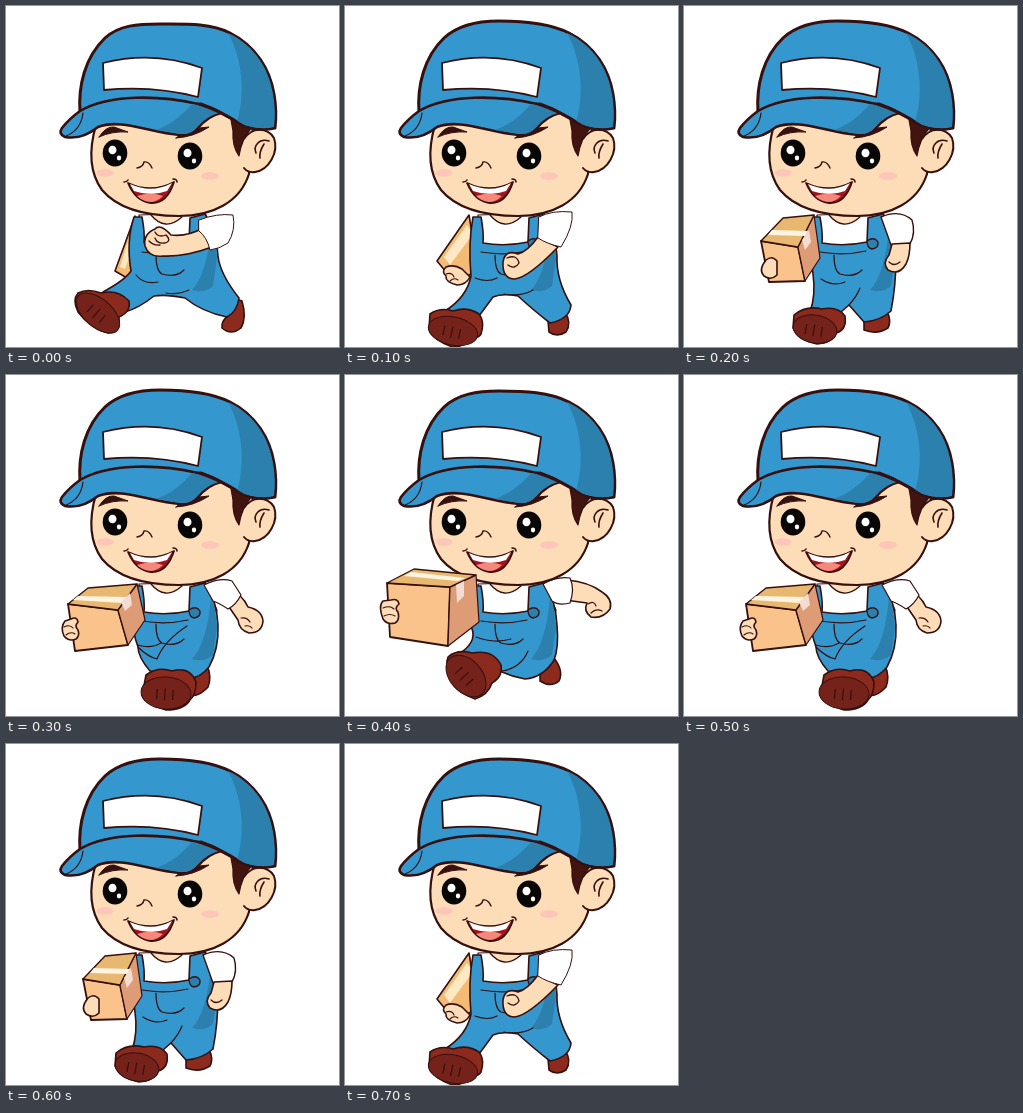
An HTML page for the animation above (800 ms loop, 333 px wide and 341 px high).

```html
<!DOCTYPE html>
<html>
<head>
<meta charset="utf-8">
<style>
html, body { margin: 0; width: 333px; height: 341px; overflow: hidden; background: #fff }
svg { display: block }
</style>
</head>
<body>
<svg id="stage" width="333" height="341" viewBox="0 0 333 341" stroke-linejoin="round" stroke-linecap="round"></svg>
<script>
const INK = '#35100f', BLUE = '#3498cf', DEEP = '#2b80ae', SKIN = '#fddcb8',
      SHOE = '#8c2b1d', SOLE = '#74221a', WHITE = '#fff';

const path = (d, fill = 'none', width = 1.6, ink = INK) =>
  `<path d="${d}" fill="${fill}" stroke="${width ? ink : 'none'}" stroke-width="${width}"/>`;
const oval = (x, y, rx, ry, fill) => `<ellipse cx="${x}" cy="${y}" rx="${rx}" ry="${ry}" fill="${fill}"/>`;
const poly = (points, fill, width) => path('M' + points.join('L') + 'Z', fill, width);

function eye(x, y) {
  return oval(x, y, 12.3, 13.5, '#090606') + oval(x - 2.5, y - 3, 4, 4.3, WHITE) + oval(x + 4, y + 5, 2.2, 2.4, WHITE);
}

function head(top) {
  return path('M90 119C83 143 83 166 96 184C112 203 140 210 173 210C207 210 234 196 243 168L247 120L205 103Z', SKIN, 2.2) +
    path('M224 108L246 121Q235 134 233 150Q226 140 227 125Z', '#421410', 1.2) +
    path('M238 133C246 121 261 121 268 132C273 146 263 164 249 166Q242 167 238 162', SKIN, 2) +
    path('M263 135C253 132 247 140 250 147M258 138Q253 146 254 152') +
    oval(99, 167, 8.5, 3.8, '#fdc6b8') + oval(204, 170, 9, 3.8, '#fdc6b8') +
    eye(109, 147) + eye(184, 150) +
    path('M93 131Q100 120 108 121L122 126Q106 125 93 131Z', INK, 1) +
    path('M170 132Q180 122 203 121Q188 131 170 132Z', INK, 1) +
    path('M131 162Q137 161 138 156Q143 155 146 162', 'none', 1.4) +
    path('M122 177Q146 188 168 176Q161 198 145 197Q130 196 122 177Z', '#a5141c', 1.8) +
    path('M124 178Q146 188 166 177L161 185Q145 191 128 185Z', WHITE, 0) +
    path('M131 190Q145 185 157 190Q151 196 144 196Q136 195 131 190Z', '#f5877b', 0) +
    path('M118 176Q121 176 122 174M167 173Q171 173 171 176') +
    // cap
    path(`M74 107C72 80 79 51 99 32C113 19 132 ${top} 154 ${top}C180 ${top} 204 17 224 27C250 40 264 64 268 88Q271 105 269 122Q252 126 236 119Q216 106 195 98Z`, BLUE, 3) +
    path('M222 27C250 40 263 64 267 88Q270 105 268 121Q252 125 231 116C238 94 239 58 222 27Z', DEEP, 0) +
    path('M74 105C103 88 153 89 192 98Q209 102 215 107Q202 110 192 122Q186 130 174 129C144 127 115 112 92 121Q76 134 59 131Q52 128 56 122Q63 113 74 105Z', BLUE, 2.6) +
    path('M150 124C167 118 177 108 186 98Q207 102 213 107Q201 110 191 121Q185 129 174 128Z', DEEP, 0) +
    path('M60 130Q75 124 77 107', 'none', 1.2) +
    path('M192 98Q216 106 236 119', 'none', 2.2) +
    path('M97 57Q148 44 196 62L192 91Q147 79 98 84Z', WHITE, 1.8);
}

function torso(legs, folds) {
  return path('M133 209L199 207L211 235L205 262L135 260Z', WHITE, 1.2) +
    path('M145 209Q159 226 176 211', SKIN, 1.3) +
    path('M128 211L136 211Q139 227 138 237Q160 241 183 236L184 212L199 208Q211 226 212 250' + legs, BLUE, 1.6) +
    path('M205 222Q210 236 211 252L207 280Q198 288 186 284Q201 268 205 222Z', DEEP, 0) +
    path('M136 246Q160 250 182 245M150 249Q150 265 156 268Q170 272 178 264' + folds, 'none', 1.2) +
    path('M183 235Q190 230 194 236Q195 242 188 243Q183 242 183 235Z', DEEP, 1.3);
}

function shoe(outline, x, y, rx, ry, turn) {
  return path(outline, SHOE, 1.6) +
    `<g transform="translate(${x} ${y}) rotate(${turn})">` +
    `<ellipse rx="${rx}" ry="${ry}" fill="${SOLE}" stroke="${INK}"/>` +
    path('M-9 -3V6M-1 -4V7M7 -3V6', 'none', 1.2) + '</g>';
}

// corners: a-b-c-d front, b-e-f-c side, a-g-e-b top
function parcel([a, b, c, d, e, f, g], strip, flap) {
  return poly([a, b, c, d], '#fac38c', 1.8) + poly([b, e, f, c], '#dd9c75', 1.2) +
    poly([a, g, e, b], '#e8b870', 1.4) + poly(strip, '#fff3e2', 0) + poly(flap, '#f3dcd2', 0);
}
const sliver = (points, shine) => poly(points, '#f3bb74', 1.6) + poly(shine, '#ffe8c4', 0);

// each pose: [cap top, parts behind the head, parts before it]
const poses = [
  [18,
    sliver(['129 210', '109 265', '121 272', '136 260'], ['127 220', '114 261', '119 263', '131 229']) +
    path('M222 290L236 295Q241 312 235 322Q225 330 216 322Q215 315 222 310Z', SHOE) +
    torso('Q214 268 233 292Q231 306 221 311Q196 306 179 292Q160 288 148 290Q133 302 119 306L97 286Q119 274 125 265Q120 235 128 211Z', 'M130 269Q138 279 152 276M160 287Q172 289 183 284') +
    shoe('M72 287Q82 282 95 287Q112 283 123 295Q125 306 113 311Q114 327 102 327Q84 322 72 306Q66 294 72 287Z', 92, 307, 26, 14, 41),
    path('M197 222Q181 231 165 229Q154 217 149 223Q137 228 139 240Q143 252 157 250Q179 251 206 241Z', SKIN) +
    path('M149 226Q152 232 160 229Q166 235 159 237Q151 238 149 232M143 235Q148 240 154 239', 'none', 1.3) +
    path('M193 214Q211 207 227 209Q230 224 222 237Q213 243 204 244Q201 231 193 225Z', WHITE, 1)],
  [15,
    sliver(['124 209', '92 255', '111 278', '133 263'], ['122 219', '99 251', '105 259', '128 228']) +
    path('M203 315L220 306Q227 317 221 326Q212 332 204 326Z', SHOE) +
    torso('Q211 274 226 299Q225 313 205 317Q187 303 173 290Q157 287 148 291Q140 302 134 310L100 305Q122 291 126 270Q123 238 128 211Z', 'M130 272Q143 277 152 272M159 288Q176 291 188 284') +
    path('M101 261Q109 258 117 263L125 271Q121 279 112 279Q100 276 101 270Q96 266 101 261Z', SKIN) +
    path('M101 268Q107 266 109 271M105 275Q109 271 113 274', 'none', 1.1) +
    shoe('M85 308Q95 301 108 305Q122 300 134 308Q140 316 136 328Q133 333 125 331Q120 341 108 341Q90 336 84 322Z', 108, 325, 25, 14, 12),
    path('M193 231Q183 245 173 248Q160 243 158 256Q157 273 170 273Q184 271 213 241Z', SKIN) +
    path('M162 252Q172 248 174 257Q170 264 163 259', 'none', 1.3) +
    path('M194 211Q207 204 227 206Q229 220 216 241Q202 238 193 232Z', WHITE, 1)],
  [15,
    path('M180 312L199 300Q209 312 204 322Q193 329 180 324Z', SHOE) +
    torso('Q212 280 207 305Q196 315 180 316L165 299L157 306L126 306Q132 289 129 268Q124 238 128 211Z', 'M137 273Q149 281 161 276M165 299Q173 290 176 282') +
    shoe('M110 309Q122 299 138 303Q154 300 161 310Q163 324 152 327Q148 337 133 338Q114 334 109 322Z', 131, 323, 22, 14, 10) +
    path('M197 211Q216 203 228 214Q232 227 226 238L207 239Z', WHITE, 1.4) +
    path('M208 238L226 237Q226 250 222 258Q215 270 204 264Q198 257 205 249Z', SKIN) +
    path('M205 256Q210 261 216 256', 'none', 1.2),
    parcel(['77 235', '114 241', '121 275', '85 276', '130 209', '136 252', '99 212'],
           ['88 224', '124 225', '121 230', '84 229'], ['118 234', '125 224', '127 236', '121 244']) +
    path('M82 254Q88 249 93 255L93 269Q87 275 80 270Q74 264 82 254Z', SKIN)],
  [15,
    path('M183 309L201 290Q206 302 202 312Q192 323 183 320Z', SHOE) +
    torso('Q213 274 203 292Q194 303 184 303L144 296Q132 282 132 272Q126 256 127 240Q125 230 128 211Z', 'M132 272Q142 282 151 284Q158 266 181 251M132 270Q145 274 155 268') +
    shoe('M140 300Q152 291 166 296Q184 291 190 307Q190 320 184 325Q178 335 160 335Q142 330 137 316Z', 160, 318, 25, 16, 4) +
    path('M223 214Q236 219 242 232Q256 235 257 246Q256 258 243 258Q233 255 232 245L221 229Z', SKIN) +
    path('M235 243Q241 242 244 247M239 251Q244 250 246 253', 'none', 1.2) +
    path('M198 210Q214 202 226 206L235 220Q230 230 222 234Q213 228 207 226Z', WHITE, 1.2),
    parcel(['62 229', '112 235', '122 270', '69 276', '131 209', '139 245', '82 213'],
           ['72 221', '121 222', '117 228', '67 225'], ['115 227', '124 218', '126 230', '119 236']) +
    path('M65 244Q71 241 72 247Q68 251 72 255Q74 261 70 264Q63 267 58 261Q54 252 59 246Z', SKIN) +
    path('M58 252Q64 249 67 253M60 260Q65 256 69 259', 'none', 1.1)],
  [16,
    path('M195 291L209 283Q219 296 214 306Q206 313 195 306Z', SHOE) +
    torso('Q214 273 209 285Q199 302 180 304Q168 302 157 297L117 277Q134 264 125 250Q124 230 128 211Z', 'M131 262Q149 269 166 264M157 296Q176 293 183 276') +
    shoe('M103 282Q112 274 127 278Q148 274 156 290Q158 302 147 308Q143 320 130 324Q112 318 104 302Q100 290 103 282Z', 121, 301, 24, 16, 48) +
    path('M222 205Q244 207 257 217Q268 224 265 234Q258 244 246 242Q238 236 242 228L220 225Z', SKIN) +
    path('M243 229Q249 225 251 231M246 238Q251 233 257 236', 'none', 1.2) +
    path('M198 209Q212 201 225 203Q230 214 225 228Q214 231 207 226Z', WHITE, 1.2),
    parcel(['42 208', '105 212', '103 271', '45 262', '131 200', '134 247', '69 194'],
           ['59 201', '113 206', '120 203', '66 197'], ['111 210', '119 206', '119 221', '112 228']) +
    path('M46 225Q53 223 54 229Q49 233 53 237Q55 245 50 248Q42 250 38 244Q33 231 38 226Z', SKIN) +
    path('M38 233Q45 230 49 234M39 241Q45 238 50 241', 'none', 1.1)]
];

const stage = document.getElementById('stage');
stage.innerHTML = poses.map(([top, back, front]) => `<g>${back}${head(top)}${front}</g>`).join('');

const cycle = [0, 1, 2, 3, 4, 3, 2, 1];
function draw(now) {
  const current = cycle[Math.floor(now / 100) % cycle.length];
  [...stage.children].forEach((g, i) => g.style.display = i === current ? '' : 'none');
}
function tick() {
  draw(performance.now());
  requestAnimationFrame(tick);
}
tick();
</script>
</body>
</html>
```
